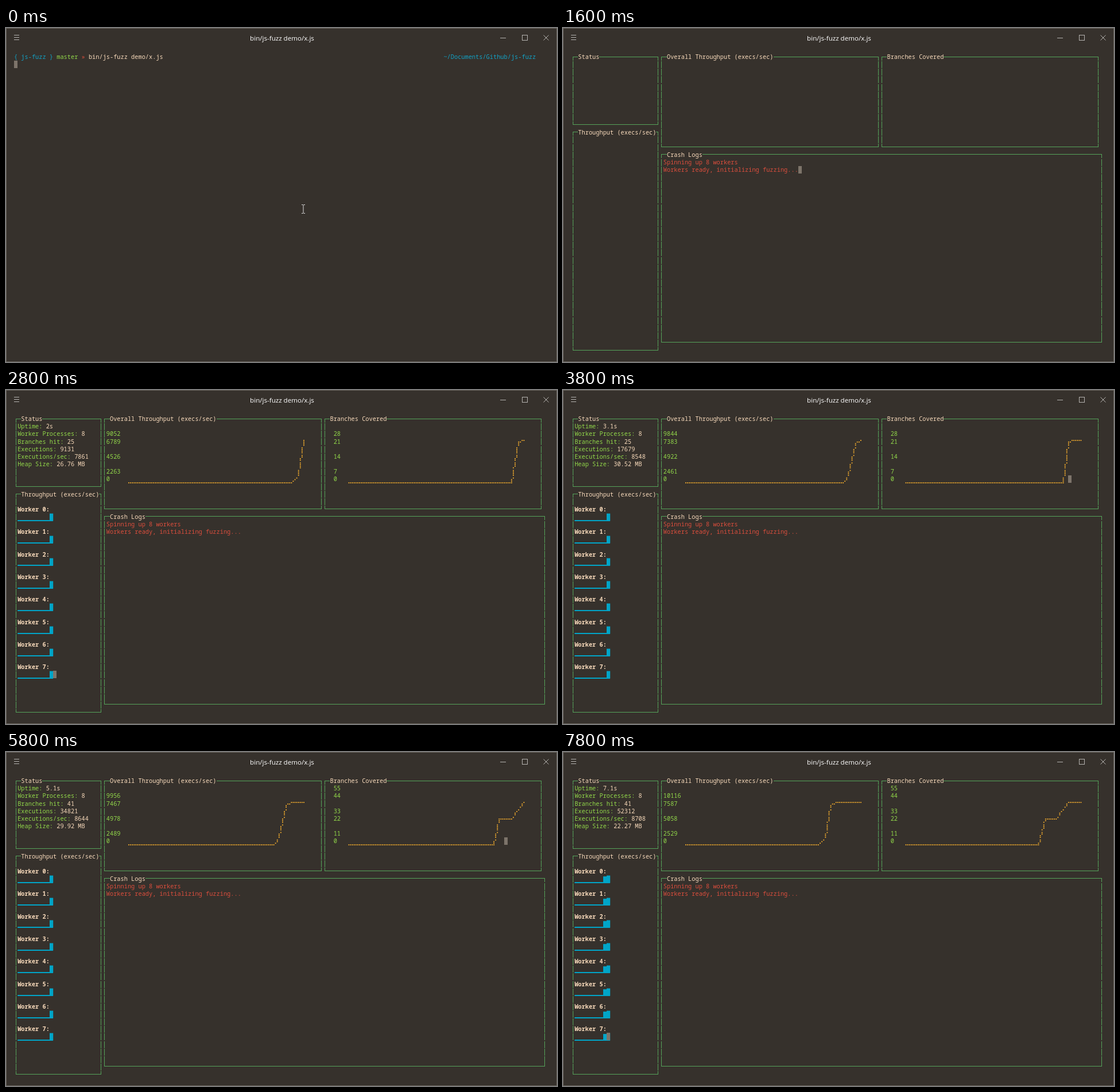
An HTML page with a canvas for the animation above (8000 ms loop, 960 px wide and 583 px high).

```html
<!DOCTYPE html>
<html>
<head>
<meta charset="utf-8">
<style>
html, body { margin: 0; width: 100%; height: 100%; overflow: hidden; background: #36312c; }
canvas { display: block; }
</style>
</head>
<body>
<canvas width="960" height="583"></canvas>
<script>
const ctx = document.querySelector('canvas').getContext('2d');
const LOOP = 8000, CELL_W = 6.185, CELL_H = 13.13;
const CREAM = '#f8dabb', BLUE = '#12a2c6', CYAN = '#00a5c8', GREEN = '#92d84a',
      RED = '#dc4e3d', BORDER = '#55a35a', YELLOW = '#f5ae2e', CURSOR = '#7d746a';

// Chart history, one sample per second
const rates = [1270, 7872, 8561, 8510, 8658, 8797, 8720];
const branches = [24, 25, 25, 33, 41, 41, 41];

// start, uptime, branches hit, executions, per second, heap, sparkline, cursor column, cursor row
const reports = [
  [1800, '1s', 24, 1270, 1270, 22.41, [1, 1], 11, 34],
  [2800, '2s', 25, 9131, 7861, 26.76, [1, 8], 11, 34],
  [3800, '3.1s', 25, 17679, 8548, 30.52, [1, 8], 140, 8],
  [4800, '4.1s', 33, 26177, 8498, 34.13, [1, 8], 139, 8],
  [5800, '5.1s', 41, 34821, 8644, 29.92, [1, 8], 138, 8],
  [6800, '6.1s', 41, 43604, 8783, 26.08, [4, 8], 136, 8],
  [7800, '7.1s', 41, 52312, 8708, 22.27, [7, 8], 10, 34]
];

const colX = col => 14 + col * CELL_W;
const rowY = row => 44 + row * CELL_H;

function rect(x, y, w, h, color) {
  ctx.fillStyle = color;
  ctx.fillRect(x, y, w, h);
}

function text(col, row, string, color, weight = 'normal') {
  ctx.font = weight + ' 10.3px "Noto Sans Mono", monospace';
  ctx.fillStyle = color;
  [...string].forEach((ch, i) => ctx.fillText(ch, colX(col + i), rowY(row) + 10.2));
}

function cursor(col, row) {
  rect(Math.round(colX(col)), Math.round(rowY(row)), 6, 13, CURSOR);
}

function verticalBar(col, row) {
  rect(Math.floor(colX(col + .5)), Math.round(rowY(row)) + 1, 1, 12, BORDER);
}

function box(left, top, right, bottom, title, lastRow) {
  const x0 = Math.floor(colX(left + .5)), x1 = Math.floor(colX(right + .5));
  const lineY = row => Math.floor(rowY(row) + 6);
  const titleEnd = Math.round(colX(left + 2 + title.length));
  rect(x0, lineY(top), Math.round(colX(left + 2)) - x0, 1, BORDER);
  rect(titleEnd, lineY(top), x1 - titleEnd, 1, BORDER);
  text(left + 2, top, title, CREAM);
  for (const x of [x0, x1]) rect(x, lineY(top), 1, 7, BORDER);
  for (let row = top + 1; row < bottom && row <= lastRow; row++) {
    verticalBar(left, row);
    verticalBar(right, row);
  }
  if (bottom > lastRow) return;
  rect(x0, lineY(bottom), x1 - x0 + 1, 1, BORDER);
  for (const x of [x0, x1]) rect(x, lineY(bottom) - 5, 1, 6, BORDER);
}

function layout(top, lastRow) {
  box(0, top, 24, top + 9, 'Status', lastRow);
  box(25, top, 86, top + 12, 'Overall Throughput (execs/sec)', lastRow);
  box(87, top, 148, top + 12, 'Branches Covered', lastRow);
  box(0, top + 10, 24, top + 39, 'Throughput (execs/sec)', lastRow);
  box(25, top + 13, 149, top + 38, 'Crash Logs', lastRow);
}

// Braille-style plot: 100 dots wide, 24 levels high, four levels per text row
function chart(labelCol, x0, history) {
  const max = Math.max(...history), step = Math.floor(max * 1.15 / 4);
  for (let v = 0; ; v += step) {
    const row = 8 - Math.floor((v / max * 23 + 1) / 4);
    if (row < 1) break;
    text(labelCol, row, String(v), GREEN);
  }
  const samples = Array(30 - history.length).fill(0).concat(history);
  const points = samples.map((v, i) =>
    [Math.round(i * 99 / 29), Math.ceil(v / max * 23 - .2)]);
  const dots = new Set();
  for (let i = 1; i < points.length; i++) {
    const [ax, ay] = points[i - 1], [bx, by] = points[i];
    const n = Math.max(bx - ax, Math.abs(by - ay));
    for (let s = 0; s <= n; s++) {
      dots.add(Math.round(ax + (bx - ax) * s / n) + ',' + Math.round(ay + (by - ay) * s / n));
    }
  }
  for (const dot of dots) {
    const [i, level] = dot.split(',').map(Number);
    const y = rowY(8 - Math.floor(level / 4)) + 13 - level % 4 * 2.8;
    rect(x0 + i * 3.08 - .9, y - .9, 1.8, 1.8, YELLOW);
  }
}

function sparkline(row, heights) {
  const bottom = Math.round(rowY(row)) + 14;
  rect(colX(1), bottom - 2, colX(11) - colX(1), 2, CYAN);
  heights.forEach((h, i) => {
    if (h > 1) rect(Math.round(colX(9 + i)), bottom - 1 - h * 1.55, 6.2, h * 1.55, CYAN);
  });
}

function report(index) {
  const [, uptime, hits, execs, rate, heap, bars, cursorCol, cursorRow] = reports[index];
  const lines = [['Uptime:', uptime], ['Worker Processes:', 8], ['Branches hit:', hits],
    ['Executions:', execs], ['Executions/sec:', rate], ['Heap Size:', heap.toFixed(2) + ' MB']];
  lines.forEach(([label, value], i) => {
    text(1, i + 1, label, GREEN);
    text(label.length + 2, i + 1, String(value), CREAM);
  });
  chart(26, 214, rates.slice(0, index + 1));
  chart(90, 597.5, branches.slice(0, index + 1));
  for (let i = 0; i < 8; i++) {
    text(1, 12 + i * 3, `Worker ${i}:`, CREAM, 'bold');
    sparkline(13 + i * 3, bars);
  }
  cursor(cursorCol, cursorRow);
}

function prompt() {
  text(0, 0, '{ js-fuzz }', BLUE);
  text(12, 0, 'master', GREEN);
  text(19, 0, '»', RED);
  text(21, 0, 'bin/js-fuzz demo/x.js', CREAM);
  text(121, 0, '~/Documents/Github/js-fuzz', BLUE);
}

function windowFrame() {
  rect(0, 0, 960, 583, '#36312c');
  ctx.lineWidth = 1;
  ctx.strokeStyle = '#6a665f';
  ctx.strokeRect(.5, .5, 959, 582);
  ctx.font = '11.6px "Open Sans", sans-serif';
  ctx.fillStyle = '#fff';
  ctx.textAlign = 'center';
  ctx.fillText('bin/js-fuzz demo/x.js', 481, 21.5);
  ctx.textAlign = 'left';
  for (const y of [12, 16, 20]) rect(14, y, 9, 1, '#b5b3b0');
  rect(861, 17, 10, 1, '#b5b3b0');
  ctx.strokeStyle = '#b5b3b0';
  ctx.strokeRect(899.5, 12.5, 9, 9);
  ctx.beginPath();
  ctx.moveTo(936.5, 12.5); ctx.lineTo(945.5, 21.5);
  ctx.moveTo(945.5, 12.5); ctx.lineTo(936.5, 21.5);
  ctx.stroke();
}

function mousePointer() {
  rect(517.5, 309, 1, 14, '#ddd');
  for (const y of [308, 323]) {
    rect(515, y, 2.5, 1, '#ddd');
    rect(518.5, y, 2.5, 1, '#ddd');
  }
}

function draw(t) {
  windowFrame();
  if (t < 1600) prompt();
  if (t < 1000) {
    cursor(0, 1);
    mousePointer();
  } else if (t < 1200) {
    layout(1, 33);
    verticalBar(0, 34);
    cursor(1, 34);
  } else if (t < 1600) {
    layout(1, 39);
    text(26, 15, 'Spinning up 8 workers', RED);
    cursor(47, 15);
  } else {
    layout(0, 39);
    text(26, 14, 'Spinning up 8 workers', RED);
    text(26, 15, 'Workers ready, initializing fuzzing...', RED);
    if (t < 1800) cursor(64, 15);
    else report(reports.findLastIndex(r => t >= r[0]));
  }
}

function tick() {
  draw(performance.now() % LOOP);
  requestAnimationFrame(tick);
}
tick();
</script>
</body>
</html>
```
